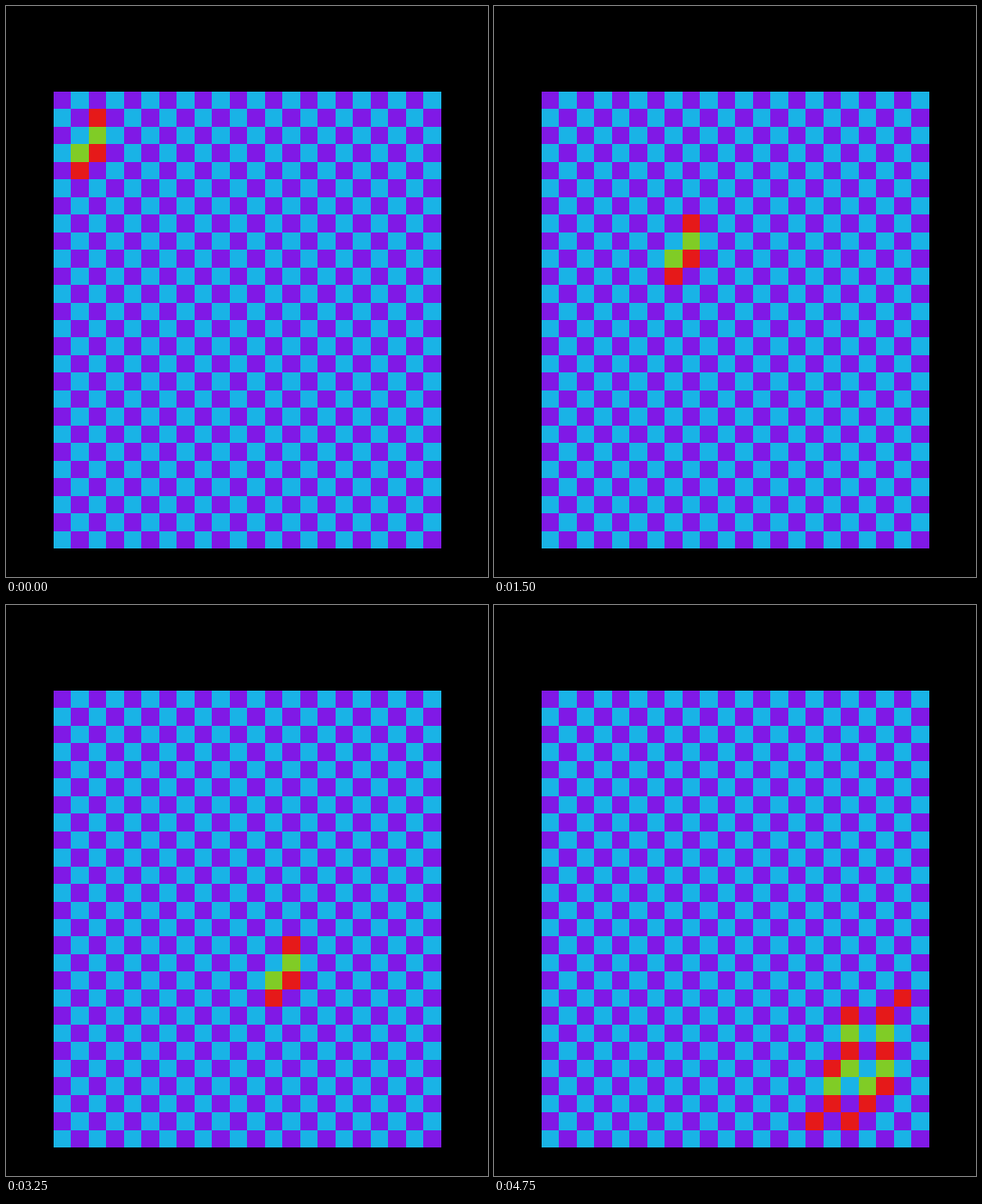
Recreate the animation shown at these times as an HTML page with a canvas. Size 506x600 px, loop 5000 ms.

```html
<!DOCTYPE html>
<html lang="en">
<head>
<meta charset="utf-8">
<title>Cells on a checkerboard</title>
<style>
  html, body { margin: 0; height: 100%; overflow: hidden; background: #000; }
  canvas { display: block; }
</style>
</head>
<body>
<canvas id="stage" width="506" height="600"></canvas>
<script>
const ctx = document.getElementById('stage').getContext('2d');
const COLS = 22, ROWS = 26, STEP_MS = 250, STEPS = 20;
const IDLE = ['#8019e6', '#19b3e6'];   // even and odd squares
const LIVE = ['#80cc26', '#e61919'];

const WALKER = ['.#', '.#', '##', '#.'];
const BURST = [
  '.....#',
  '..#.#.',
  '..#.#.',
  '..#.#.',
  '.##.#.',
  '.#.##.',
  '.#.#..',
  '#.#...',
];

const edgeX = col => Math.floor(50 + col * 18.5);
const edgeY = row => Math.round(90 + row * 480 / ROWS);

function drawCell(col, row, colors) {
  const x = edgeX(col), y = edgeY(row);
  ctx.fillStyle = colors[(col + row) % 2];
  ctx.fillRect(x, y, edgeX(col + 1) - x, edgeY(row + 1) - y);
}

function drawPattern(pattern, left, top) {
  pattern.forEach((line, row) => [...line].forEach((mark, col) => {
    if (mark === '#') drawCell(left + col, top + row, LIVE);
  }));
}

function draw(step) {
  ctx.fillStyle = '#000';
  ctx.fillRect(0, 0, 506, 600);
  for (let row = 0; row < ROWS; row++)
    for (let col = 0; col < COLS; col++) drawCell(col, row, IDLE);

  if (step === STEPS - 1) drawPattern(BURST, 15, 17);
  else {
    const sidestep = step >= 13 ? 2 : 0;
    drawPattern(WALKER, 1 + step - sidestep, 1 + step);
  }
}

function tick() {
  draw(Math.floor(performance.now() / STEP_MS) % STEPS);
  requestAnimationFrame(tick);
}
tick();
</script>
</body>
</html>
```
